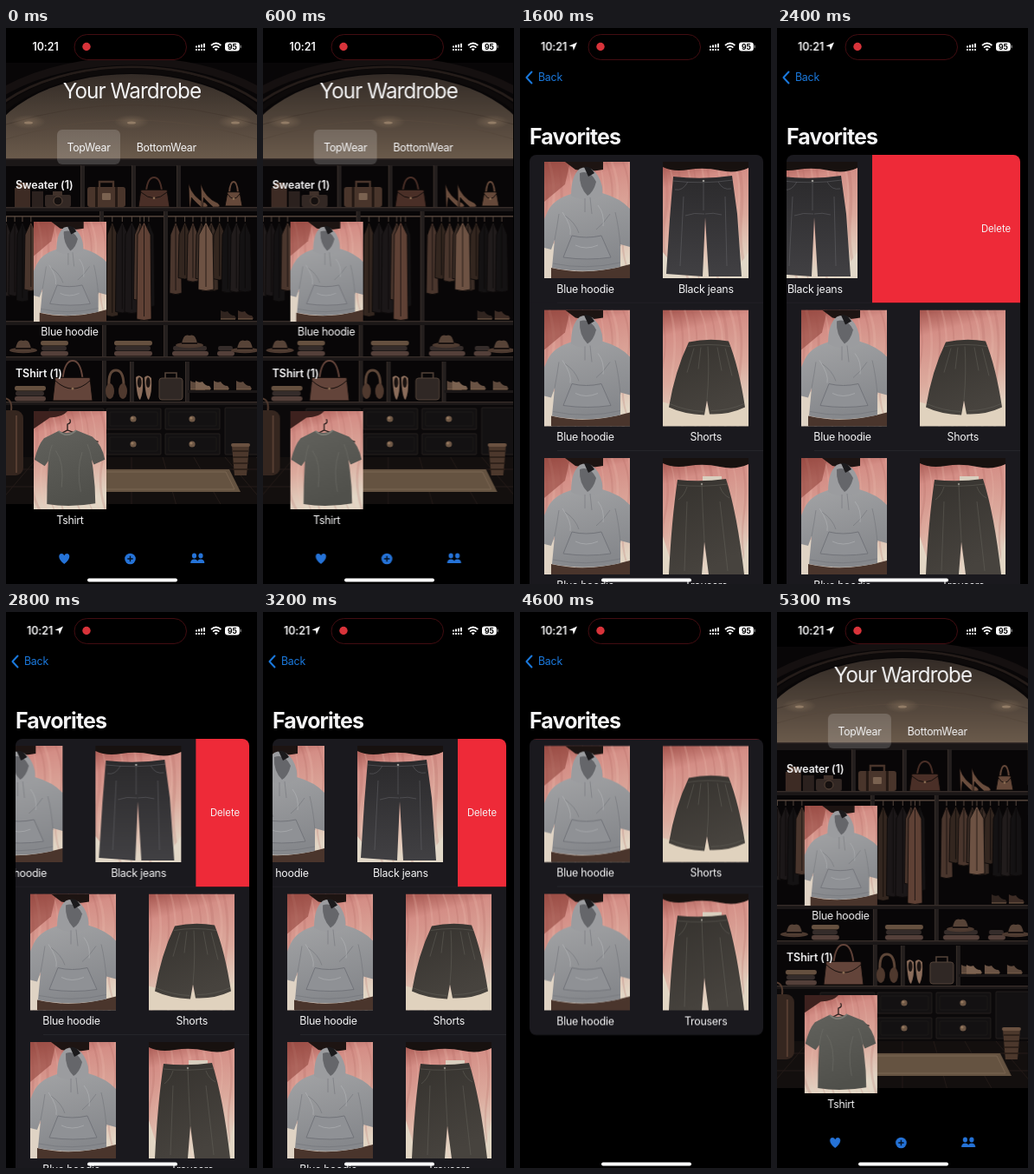
Animation, 290 px wide and 640 px high, one loop 5400 ms. Source, as an HTML page:

```html
<!DOCTYPE html>
<html lang="en">
<head>
<meta charset="utf-8">
<title>Wardrobe</title>
<style>
html, body { margin: 0; width: 100%; height: 100%; overflow: hidden; background: #000; }
svg { display: block; width: 100%; height: 100%; }
text { font: 400 12.4px Inter, "Noto Sans", sans-serif; letter-spacing: -.25px; fill: #f4f4f5; }
.mid { text-anchor: middle; }
.title { font-size: 24.3px; letter-spacing: -.95px; }
.large { font-size: 25px; font-weight: 700; letter-spacing: -.9px; }
.head { font-size: 12.5px; font-weight: 600; letter-spacing: -.1px; }
.delete { font-size: 11.3px; letter-spacing: 0; }
.level { font-size: 8.6px; font-weight: 700; fill: #000; }
</style>
</head>
<body>
<svg viewBox="0 0 290 640">
  <defs>
    <linearGradient id="bedFill" x2=".2" y2="1">
      <stop offset="0" stop-color="#a4544d"/><stop offset=".22" stop-color="#d48e86"/>
      <stop offset=".62" stop-color="#dcaa9d"/><stop offset="1" stop-color="#e2d6c5"/>
    </linearGradient>
    <linearGradient id="greyFill" x2=".3" y2="1">
      <stop offset="0" stop-color="#a2a3a5"/><stop offset="1" stop-color="#86888c"/>
    </linearGradient>
    <linearGradient id="denimFill" x2="0" y2="1">
      <stop offset="0" stop-color="#2b2a2c"/><stop offset="1" stop-color="#414043"/>
    </linearGradient>
    <linearGradient id="oliveFill" x2=".4" y2="1">
      <stop offset="0" stop-color="#35322e"/><stop offset="1" stop-color="#47433e"/>
    </linearGradient>
    <linearGradient id="teeFill" x2=".4" y2="1">
      <stop offset="0" stop-color="#62625d"/><stop offset="1" stop-color="#50504b"/>
    </linearGradient>
    <linearGradient id="dome" x2="0" y2="1">
      <stop offset="0" stop-color="#332b26"/><stop offset=".5" stop-color="#6a5a4b"/>
    </linearGradient>
    <radialGradient id="glow">
      <stop offset="0" stop-color="#b99c7c" stop-opacity=".3"/><stop offset="1" stop-color="#b99c7c" stop-opacity="0"/>
    </radialGradient>
    <clipPath id="cardClip"><rect x="11" y="146" width="270" height="900" rx="8"/></clipPath>
    <clipPath id="lowerClip"><rect x="11" y="300" width="270" height="357.5" rx="8"/></clipPath>
  </defs>

  <g id="home"></g>
  <rect id="dim" width="290" height="640" opacity="0"/>

  <g id="page">
    <rect width="300" height="640"/>
    <text class="large" x="11" y="134">Favorites</text>
    <g clip-path="url(#cardClip)">
      <g id="swipe"></g>
      <text id="del" class="delete mid" x="253" y="235">Delete</text>
      <g id="lower"></g>
    </g>
  </g>
  <g id="back">
    <path d="M13.5 50.5L7.5 57L13.5 63.5" fill="none" stroke="#1a78dc" stroke-width="2" stroke-linecap="round" stroke-linejoin="round"/>
    <text x="21" y="61" style="fill:#1a78dc">Back</text>
  </g>
  <g id="status"></g>
</svg>

<script>
const LOOP = 5400, ROW = 170.5;
const $ = id => document.getElementById(id);
const rect = (x, y, w, h, fill, rx = 0, more = '') =>
  `<rect x="${x}" y="${y}" width="${w}" height="${h}" rx="${rx}" fill="${fill}" ${more}/>`;
const path = (d, fill = 'none', stroke = 'none', sw = 1, more = '') =>
  `<path d="${d}" fill="${fill}" stroke="${stroke}" stroke-width="${sw}" ${more}/>`;
const oval = (x, y, rx, ry, fill, more = '') =>
  `<ellipse cx="${x}" cy="${y}" rx="${rx}" ry="${ry}" fill="${fill}" ${more}/>`;
const text = (s, x, y, cls = 'mid') => `<text class="${cls}" x="${x}" y="${y}">${s}</text>`;
const range = (n, f) => Array.from({ length: n }, (_, i) => f(i)).join('');
const random = seed => () => (seed = (seed * 16807) % 2147483647) / 2147483647;

// Clothes photos on a 99 x 134 base
function photo(id, seed, clothes) {
  const rnd = random(seed);
  const folds = range(15, i => path(
    `M${i * 9 - 22 + rnd() * 5} 0q${6 + rnd() * 8} 30 3 66t${4 + rnd() * 8} 70`,
    'none', i % 2 ? '#f0c0b4' : '#a9605a', 1.5 + rnd() * 2, 'opacity=".2"'));
  return `<symbol id="${id}" viewBox="0 0 99 134" preserveAspectRatio="none">` +
    rect(0, 0, 99, 134, 'url(#bedFill)') + folds + clothes + '</symbol>';
}
const darkTop = path('M0 0H99V7Q84 14 66 10T30 9Q12 12 0 6z', '#17110f');
const creases = (color, list) => list.map(d => path(d, 'none', color, 1, 'opacity=".5"')).join('');

const hoodie = path('M0 0H30L24 26L0 46z', '#93473f', 'none', 1, 'opacity=".6"') +
  path('M24 0H68V9Q50 12 36 9z', '#1d1412') +
  path('M0 96L12 94L9 134H0z', '#dfd3c4') +
  path('M8 122Q50 132 99 118V134H8z', '#4a352c') +
  path('M31 37Q11 43 4 57L0 66V99L8 101L12 90L9 122Q48 130 88 121L88 95L99 98V54Q88 42 67 36z', 'url(#greyFill)') +
  path('M31 39Q31 16 41 8Q53 3 62 16Q69 28 67 39Q50 49 31 39z', '#9b9c9f') +
  path('M41 13Q53 9 60 23Q57 35 50 39Q40 29 41 13z', '#65666a') +
  path('M46 6Q53 4 58 13L51 17z', '#1b1a1c') +
  path('M32 85Q48 89 66 85L77 110Q50 114 22 110z', '#8f9195', '#72747a') +
  creases('#6c6f74', ['M12 90Q15 74 17 60', 'M88 97Q86 74 82 58', 'M10 117Q48 125 88 116', 'M24 62Q36 70 40 82',
    'M76 60Q68 72 60 78', 'M47 42V58', 'M53 41L55 60']) +
  creases('#b9bbbe', ['M21 58Q32 74 30 84', 'M62 50Q70 60 68 74', 'M36 96Q48 102 62 96']);

const jeans = path('M0 104L24 134H0zM99 104L78 134H99z', '#e2d8c8') + darkTop +
  path('M12 17Q46 21 80 16L86 60L91 132H53L49 64L46 132L4 129L8 66z', 'url(#denimFill)') +
  creases('#69686c', ['M12 22Q46 26 81 21', 'M14 32Q23 34 29 23', 'M79 31Q69 33 64 23', 'M47 24V56',
    'M24 40L20 120', 'M72 40L74 120', 'M48 60Q36 58 26 62', 'M49 60Q58 58 68 61']) +
  oval(47, 22, 1.3, 1.3, '#9a9894');

const shorts = path('M0 106Q50 122 99 102V134H0z', '#e0d2be') +
  path('M30 37Q53 32 76 36Q88 66 95 112Q76 121 54 120L51 104L48 121Q24 120 7 112Q14 70 30 37z', 'url(#oliveFill)') +
  creases('#67645c', ['M29 42Q53 38 78 42', 'M52 42Q54 70 51 104', 'M36 44L28 72', 'M44 43L41 68', 'M63 43L68 70',
    'M72 44L80 76', 'M8 108Q26 116 47 117', 'M56 116Q76 116 94 108']);

const trousers = path('M0 90L14 134H0zM99 90L90 134H99z', '#e2d6c4') + darkTop +
  path('M46 21H68V27H46z', '#d9cfbf') +
  path('M17 25Q44 28 73 24Q86 64 94 134H53L48 96L45 134H7Q10 72 17 25z', 'url(#oliveFill)') +
  creases('#67645c', ['M17 31Q45 34 75 30', 'M45 30Q46 60 48 96', 'M18 48Q25 43 28 33', 'M77 46Q69 42 66 33',
    'M28 50L25 130', 'M66 50L75 130']) +
  oval(45, 30, 1.2, 1.2, '#8c8980');

const tee = path('M0 0H46Q40 8 22 9L0 24z', '#3d211e') +
  path('M46 26L10 45M46 26L88 42M46 26V18Q52 16 49 11', 'none', '#2b201e', 1.6) +
  path('M34 27Q46 33 58 26L80 35Q93 46 97 66L82 73L79 66Q84 98 84 126Q50 132 18 127Q18 98 20 68L15 75L1 66Q6 46 14 37z', 'url(#teeFill)') +
  path('M34 27Q46 38 58 26', 'none', '#7c7c75', 2) +
  creases('#7a7a72', ['M20 68Q22 54 25 46', 'M79 66Q77 54 73 45', 'M30 54Q42 70 38 104', 'M66 56Q58 80 64 110']);

const use = (id, x, y, w = 99, h = 134) => `<use href="#${id}" x="${x}" y="${y}" width="${w}" height="${h}"/>`;
document.querySelector('defs').insertAdjacentHTML('beforeend',
  photo('hoodie', 11, hoodie) + photo('jeans', 23, jeans) + photo('shorts', 37, shorts) +
  photo('trousers', 51, trousers) + photo('tee', 77, tee));

// Closet picture
const WOOD = '#1b1717', EDGE = '#362d29';
const rnd = random(5);
const garment = (x, y, w, h, c) =>
  path(`M${x + w / 2} ${y}V${y - 6}`, 'none', '#594a40') +
  path(`M${x + w / 2} ${y}L${x + w} ${y + 15}L${x + w + 1} ${y + h}Q${x + w / 2} ${y + h + 3} ${x - 1} ${y + h}L${x} ${y + 15}z`, c, '#0b0808', .8) +
  path(`M${x + w / 2} ${y + 4}V${y + h - 3}`, 'none', '#0b0808', .7);
const hang = (x, n, step, h) => range(n, i => garment(x + i * step, 223, 11 + rnd() * 4, h - rnd() * 24,
  ['#1b1718', '#33261f', '#141213', '#4a362d', '#211c1c', '#3a2c25'][Math.floor(rnd() * 6)]));
const bag = (x, y, w, h, c) =>
  path(`M${x + w * .25} ${y + h * .45}Q${x + w * .3} ${y} ${x + w / 2} ${y}T${x + w * .75} ${y + h * .45}`, 'none', c, 2) +
  path(`M${x + 3} ${y + h * .42}H${x + w - 3}L${x + w} ${y + h}H${x}z`, c, '#0e0a09') +
  path(`M${x + 3} ${y + h * .5}Q${x + w / 2} ${y + h * .9} ${x + w - 3} ${y + h * .5}`, 'none', '#17100e') +
  oval(x + w / 2, y + h * .7, 1.4, 1.4, '#8a6c52');
const stack = (x, y, w, n) => range(n, i =>
  rect(x + (i % 2), y - 6 * i, w - (i % 2) * 3, 5.4, ['#54403a', '#352c2a', '#65503f'][i % 3], 2.4));
const hat = (x, y) => oval(x, y, 16, 3.2, '#4d3a30') + path(`M${x - 9} ${y}Q${x - 8} ${y - 14} ${x} ${y - 11}Q${x + 8} ${y - 14} ${x + 9} ${y}z`, '#574337') +
  path(`M${x - 9} ${y - 2}H${x + 9}`, 'none', '#1c1412', 2);
const heel = (x, y, s) => path(`M${x} ${y - 24 * s}Q${x + 5 * s} ${y - 9 * s} ${x + 18 * s} ${y - 4 * s}Q${x + 22 * s} ${y} ${x + 18 * s} ${y}H${x + 13 * s}Q${x + 6 * s} ${y - 6 * s} ${x + 3 * s} ${y - 10 * s}L${x + 2 * s} ${y}H${x + s}z`, '#6a4d3d', '#0e0a09', .6);
const shoe = (x, y, c) => path(`M${x} ${y}V${y - 10}Q${x + 4} ${y - 7} ${x + 8} ${y - 9}Q${x + 11} ${y - 4} ${x + 16} ${y - 4}Q${x + 19} ${y} ${x + 17} ${y}z`, c) +
  path(`M${x} ${y}H${x + 17}`, 'none', '#80654f');
const pump = x => path(`M${x} 402Q${x + 4} 398 ${x + 8} 403Q${x + 9} 420 ${x + 5} 428Q${x + 1} 426 ${x} 402z`, '#8a6c5a') + oval(x + 4.2, 408, 2.4, 6, '#1a1311');
const shelf = (y, h = 5) => rect(0, y, 290, h, WOOD) + rect(0, y, 290, 1.3, EDGE);
const post = (x, y, h) => rect(x, y, 5, h, '#241f1e') + rect(x, y, 1, h, EDGE);
const drawer = (x, y) => rect(x, y, 63, 24, '#131112', 1, 'stroke="#2a2422" stroke-width=".8"') +
  rect(x + 4, y + 4, 55, 16, 'none', 1, 'stroke="#221d1c" stroke-width=".7"') + oval(x + 31, y + 12, 3.6, 3.6, '#6f5846') + oval(x + 30, y + 11, 1.6, 1.6, '#96795f');
const ring = (rx, ry, color, w) => oval(145, 150, rx, ry, 'none', `stroke="${color}" stroke-width="${w}"`);

const closet = rect(0, 0, 290, 640, '#080607') + rect(0, 0, 290, 40, '#000') +
  ring(204, 112, '#151010', 9) + ring(187, 105, '#241c19', 3) + ring(178, 101, '#0d0a0a', 6) +
  oval(145, 150, 169, 97, 'url(#dome)') +
  path('M0 128Q145 84 290 128', 'none', '#57493d', 1.2) + path('M0 111Q145 66 290 111', 'none', '#463a31') +
  [26, 145, 265].map(x => oval(x, 108, 20, 8, 'url(#glow)') + oval(x, 109, 5, 1.6, '#927c66')).join('') +
  rect(0, 150, 290, 490, '#080607') + shelf(150, 9) +
  post(86, 158, 50) + post(145, 158, 50) + post(197, 158, 50) +
  rect(10, 184, 18, 22, '#3d2b24') + rect(13, 178, 12, 6, '#523a2e') + rect(30, 188, 13, 18, '#2b211e') +
  rect(45, 192, 30, 14, '#332824', 2) + oval(60, 199, 5, 5, '#15100f', 'stroke="#5b473b"') + rect(54, 188, 11, 5, '#40312a') +
  rect(94, 183, 44, 23, '#49352b', 3) + path('M108 183V177H124V183', 'none', '#49352b', 2.4) + rect(103, 183, 3, 23, '#241914') + rect(126, 183, 3, 23, '#241914') + rect(111, 190, 10, 8, '#7a6250', 1) +
  bag(153, 172, 36, 34, '#4a2f27') + heel(211, 206, 1.1) + heel(225, 206, 1.1) + bag(253, 177, 20, 28, '#66493a') +
  shelf(206) + rect(0, 216, 290, 1.6, '#4e4037') +
  hang(-5, 4, 9, 100) + hang(117, 5, 10.5, 112) + hang(190, 9, 10, 84) +
  garment(223, 223, 16, 78, '#6d5243') + garment(152, 223, 15, 112, '#5f4135') +
  shoe(248, 335, '#30241f') + shoe(268, 335, '#3d2c25') +
  post(108, 211, 128) + post(182, 211, 128) + shelf(337) +
  hat(20, 371) + stack(40, 372, 32, 3) + stack(125, 372, 44, 3) + stack(192, 372, 42, 2) + hat(212, 365) + stack(244, 372, 20, 2) + hat(276, 371) +
  post(111, 342, 88) + post(182, 342, 38) + shelf(378) + post(143, 384, 46) + post(207, 384, 46) +
  bag(54, 383, 46, 46, '#63443a') + stack(10, 424, 36, 3) +
  path('M119 412Q118 394 127 394T136 412', 'none', '#5d4638', 3) + oval(120, 418, 5, 9, '#4f392e') + oval(135, 418, 5, 9, '#4f392e') +
  pump(150) + pump(160) + rect(177, 403, 27, 25, '#302825', 3, 'stroke="#54443a"') + path('M184 403V397H197V403', 'none', '#54443a', 1.6) +
  shoe(213, 416, '#5e493c') + shoe(219, 416, '#7b6250') + shoe(240, 416, '#6a5344') + shoe(266, 416, '#5e493c') +
  rect(210, 417, 80, 3, WOOD) + shelf(430, 4) + rect(0, 434, 290, 60, '#0b090a') +
  [50, 116, 184].map(x => drawer(x, 438) + drawer(x, 467)).join('') +
  rect(253, 437, 40, 54, '#131112', 1, 'stroke="#2a2422" stroke-width=".8"') +
  rect(0, 494, 290, 56, '#130f0e') + range(9, i => path(`M${145 + (i - 4) * 36} 494L${145 + (i - 4) * 52} 550`, 'none', '#241b18')) +
  path('M0 508H290M0 528H290', 'none', '#241b18') +
  path('M100 508H258L271 534H86z', '#655341') + path('M104 511H254L264 531H94z', 'none', '#7b6652', 1) +
  rect(-14, 440, 34, 75, '#35261f', 9) + path('M6 440Q8 426 -4 426M12 446V512', 'none', '#553d31', 2) +
  path('M261 481H281L278 515H264z', '#4c382c') + range(4, i => path(`M262 ${487 + i * 7}H280`, 'none', '#281c16', 1.5)) +
  rect(260, 478, 22, 4, '#6a5140', 2) + rect(0, 548, 290, 92, '#000');

const BLUE = '#2573d8';
$('home').innerHTML = closet +
  text('Your Wardrobe', 145.5, 81, 'title mid') +
  rect(59, 117, 73, 40, '#fff', 6, 'opacity=".17"') + text('TopWear', 95.5, 141.5) + text('BottomWear', 185.3, 141.5) +
  text('Sweater (1)', 11, 184.5, 'head') + use('hoodie', 32, 223, 84, 115) + text('Blue hoodie', 73.5, 353.8) +
  text('TShirt (1)', 11, 401.5, 'head') + use('tee', 32, 441, 84, 113) + text('Tshirt', 74, 571) +
  path('M67.3 617C59 611 60.600 605 64.200 605Q66.400 605 67.300 607.200Q68.200 605 70.400 605C74 605 75.600 611 67.300 617z', BLUE) +
  oval(143.5, 611, 6.3, 6.3, BLUE) + path('M140.300 611H146.700M143.500 607.800V614.200', 'none', '#04101f', 1.4) +
  [217.5, 225].map(x => oval(x, 607.6, 2.6, 3, BLUE) +
    path(`M${x - 4.3} 616Q${x - 4.3} 611.500 ${x} 611.500T${x + 4.3} 616z`, BLUE)).join('');

// Favorites list
const row = (i, id, label) => {
  const y = 146 + i * ROW;
  return rect(11, y, 270, ROW + .5, '#1a191e') +
    use('hoodie', 28, y + 8) + text('Blue hoodie', 75.5, y + 158.8) +
    use(id, 165, y + 8) + text(label, 214.8, y + 158.8) +
    (i < 2 ? rect(43, y + ROW - .6, 238, .6, '#2e2d33') : '');
};
$('swipe').innerHTML = row(0, 'jeans', 'Black jeans') + rect(281, 146, 300, ROW, '#ee2a38');
$('lower').innerHTML = `<g clip-path="url(#lowerClip)">${row(1, 'shorts', 'Shorts') + row(2, 'trousers', 'Trousers')}</g>`;

$('status').innerHTML =
  `<g id="clock">${text('10:21', 24, 26, 'head')}</g>` +
  `<g id="arrow">${path('M66 16.5L56.5 20.8L61 21.5L61.8 26z', '#fff')}</g>` +
  rect(79, 7.5, 129.5, 29, '#000', 14.5, 'stroke="#420d11"') + oval(93, 21.5, 4.7, 4.7, '#d8333a') +
  range(4, i => rect(219 + i * 3, 20.5 - i * .9, 2, 2 + i * .9, '#fff', .5) + rect(219 + i * 3, 24, 2, 2, '#fff', .5)) +
  path('M237 20Q242.7 15 248.4 20M239 22.6Q242.7 19.4 246.4 22.6', 'none', '#fff', 1.7) + path('M240.7 24.2Q242.7 22.6 244.7 24.2L242.7 26.5z', '#fff') +
  rect(253, 16.5, 16.8, 10, '#fff', 3) + rect(270.5, 19.8, 1.2, 3.4, '#999', .6) + text('95', 261.3, 24.7, 'level mid') +
  rect(94, 633.5, 104, 4, '#fff', 2);

// Motion: steps are [ms, value, easing towards the next step]
const moveX = v => ({ transform: `translateX(${v}px)` });
const moveY = v => ({ transform: `translateY(${v}px)` });
const fade = v => ({ opacity: v });
function track(id, style, steps) {
  const all = [[0, steps[0][1]], ...steps, [LOOP, steps[steps.length - 1][1]]];
  $(id).animate(all.map(([ms, v, easing = 'linear']) => ({ ...style(v), offset: ms / LOOP, easing })),
    { duration: LOOP, iterations: Infinity });
}
const spring = (start, from, to) => [...Array(13).keys()].map(i => {
  const x = i * .045 * 18;
  return [start + i * 45, to + (from - to) * (1 + x) * Math.exp(-x)];
}).concat([[start + 560, to]]);
const pushPop = (off, on) => [...spring(600, off, on), ...spring(4810, on, off)];

track('page', moveX, pushPop(290, 0));
track('home', moveX, pushPop(0, -87));
track('dim', fade, pushPop(0, .12));
track('back', fade, pushPop(0, 1));

const SOFT = 'ease-in-out', OUT = 'cubic-bezier(.2,.7,.3,1)';
track('clock', moveX, [[700, 6.5, SOFT], [890, 0]]);
track('arrow', fade, [[880, 0], [1000, 1]]);
track('swipe', moveX, [[1950, 0, SOFT], [2380, -171], [2560, -171, OUT], [2960, -56], [3500, -56, SOFT], [3740, -270]]);
track('del', moveX, [[1950, 56, SOFT], [2100, 0], [3500, 0, SOFT], [3740, -221]]);
track('lower', moveY, [[3650, 0, SOFT], [3950, -ROW]]);
</script>
</body>
</html>
```
